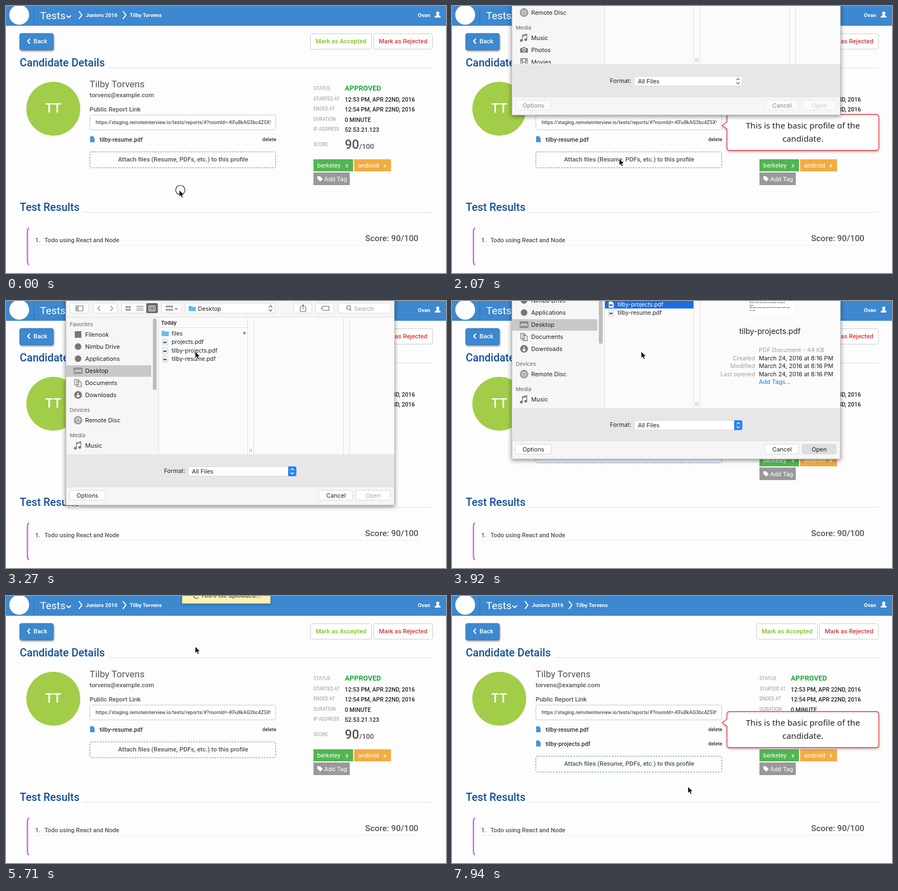
An HTML page that plays this animation: 800 by 486 pixels, repeating every 8000 ms.

```html
<!DOCTYPE html>
<html lang="en">
<head>
<meta charset="utf-8">
<title>Candidate report</title>
<style>
  html, body { margin: 0; width: 100%; height: 100%; overflow: hidden; background: #fdfdfd; }
  svg { display: block; width: 100%; height: 100%; }
  text { font-family: Roboto, sans-serif; font-weight: 500; font-size: 11.4px; fill: #555; }
  .mid { text-anchor: middle; }
  .white, .white text { fill: #fff; }
  .heading { font-size: 19.6px; fill: #14509a; }
  .crumb { font-size: 9.7px; font-weight: 700; fill: #fff; }
  .label { font-size: 8.5px; font-weight: 400; fill: #999; }
  .value { font-size: 10.5px; fill: #222; }
  .file text { font-size: 10.7px; fill: #333; }
  .file .delete { font-size: 9.2px; }
  .tag { font-weight: 400; fill: #fff; }
  .rule { stroke: #ddd; }
  .button { fill: #fff; stroke: #ccc; }
  .line { fill: none; stroke: #fff; stroke-width: 2; stroke-linecap: round; stroke-linejoin: round; }
  #bar { fill: none; stroke: #c66cf5; stroke-width: 2.5; }
  #attach rect { fill: #fdfdfd; stroke: #4a92d2; stroke-dasharray: 3 2; }
  .muted #bar { stroke: #bfbfcf; }
  .muted #attach rect { stroke: #7f8794; }
  .muted #berkeley { fill: #7cc653; }
  .muted #android { fill: #b3c846; }
  .muted #addTag { fill: #8f9399; }
  #tip text { font: 400 15.2px "Noto Sans", sans-serif; fill: #222; text-anchor: middle; }
  #tip path { fill: #fff; stroke: #e5343a; stroke-width: 1.3; filter: drop-shadow(0 2px 2px #0004); }
  #sheet text { font-family: Inter, sans-serif; font-weight: 400; font-size: 10.8px; fill: #222; }
  #sheet .group { font-size: 9.6px; font-weight: 500; fill: #777; }
  #sheet .entry { font-size: 10.3px; }
  #sheet .gray { fill: #a0a0a0; }
  #sheet .end { text-anchor: end; }
  #sheet .control { fill: #fff; stroke: #d8d8d8; }
  #sheet .icon { fill: none; stroke: #666; stroke-width: 1.1; }
  #sheet .solid { fill: #777; stroke: none; }
  #sheet.idle .tool { opacity: .5; }
  #sheet.idle .list, #sheet.idle .blue { display: none; }
  #sheet.idle #viewMode { fill: #ddd; }
  #sheet .chosen { display: none; }
  #sheet.picked .chosen { display: inline; }
  #sheet.picked #pickName { fill: #fff; }
  #sheet.picked #open { fill: #dedede; }
  #sheet:not(.picked) #openText { fill: #aaa; }
</style>
</head>
<body>
<svg id="stage" viewBox="0 0 800 486" preserveAspectRatio="none">
  <defs>
    <clipPath id="linkClip"><rect x="160" y="200" width="321" height="24"/></clipPath>
    <clipPath id="sideClip"><rect x="109" y="29" width="168" height="249"/></clipPath>
    <g id="arrows" fill="none" stroke-width="1.3"><path d="M-3-2L0-5L3-2M-3 2L0 5L3 2"/></g>
  </defs>
  <rect width="800" height="486" fill="#fdfdfd"/>

  <!-- header -->
  <rect width="800" height="36" fill="#3d88cf"/>
  <path d="M50.5 0V36" stroke="#2f72b4"/>
  <circle cx="24" cy="16" r="18" fill="#fff"/>
  <text class="white" x="62" y="24" style="font-size:19px;font-weight:400">Tests</text>
  <path class="line" d="M110.500 18L114 21L117.500 18"/>
  <path class="line" d="M133 10L138 16.500L133 23M213 10L218 16.500L213 23"/>
  <text class="crumb" x="145" y="20">Juniors 2016</text>
  <text class="crumb" x="225" y="20">Tilby Torvens</text>
  <text class="crumb" x="749" y="20">Ovan</text>
  <path class="white" d="M785 10C788 10 788.500 13 787 16Q787 17.500 790 18.500V21H779.500V18.500Q783 17.500 783 16C781.500 13 782 10 785 10"/>

  <!-- actions -->
  <rect x="25" y="50" width="61" height="30" rx="3" fill="#3d88cf" stroke="#3577b6" style="filter:drop-shadow(1px 2px 1.500px #0006)"/>
  <path class="line" d="M43 60L39.500 64L43 68"/>
  <text class="white" x="50" y="68">Back</text>
  <rect class="button" x="553.500" y="50.500" width="111" height="28" rx="3"/>
  <rect class="button" x="668.500" y="50.500" width="107" height="28" rx="3"/>
  <text class="mid" x="609" y="68" style="fill:#7fc21f">Mark as Accepted</text>
  <text class="mid" x="722" y="68" style="fill:#d23a3c">Mark as Rejected</text>

  <!-- candidate -->
  <text class="heading" x="25" y="110">Candidate Details</text>
  <path class="rule" d="M187 112.500H776M138 375.500H776"/>
  <circle cx="86" cy="187" r="49" fill="#a2cd48"/>
  <text class="mid white" x="86" y="194" style="font-size:24px">TT</text>
  <text x="152" y="148" style="font-size:17px;font-weight:400">Tilby Torvens</text>
  <text x="152" y="166">torvens@example.com</text>
  <text x="152" y="192">Public Report Link</text>
  <rect class="button" x="152.500" y="198.500" width="338" height="27" rx="3"/>
  <text x="163" y="215" clip-path="url(#linkClip)" style="font-size:9px">https://staging.remoteinterview.io/tests/reports/#?roomId=-KFu8kAG3bc4Z5X9</text>
  <g class="file">
    <path d="M153 237H158L161 240V248H153Z" fill="#4b92d4"/>
    <text x="170" y="247">tilby-resume.pdf</text><text class="delete" x="466" y="246">delete</text>
  </g>
  <g class="file" id="newFile" transform="translate(0 26)">
    <path d="M153 237H158L161 240V248H153Z" fill="#4b92d4"/>
    <text x="170" y="247">tilby-projects.pdf</text><text class="delete" x="466" y="246">delete</text>
  </g>
  <g id="attach">
    <rect x="152.500" y="265.500" width="338" height="29" rx="3"/>
    <text class="mid" x="322" y="283">Attach files (Resume, PDFs, etc.) to this profile</text>
  </g>
  <g id="facts"></g>
  <text x="616" y="154" style="font-size:12.800px;font-weight:700;fill:#23a640">APPROVED</text>
  <text x="616" y="260" style="font-size:23px">90<tspan font-size="12.800">/100</tspan></text>
  <rect id="berkeley" x="559" y="279" width="72" height="22" fill="#52b554"/>
  <rect id="android" x="633" y="279" width="67" height="22" fill="#f3ac41"/>
  <rect id="addTag" x="559" y="303" width="66" height="23" fill="#999"/>
  <text class="tag" x="566" y="294">berkeley</text><text class="tag" x="617" y="294">x</text>
  <text class="tag" x="640" y="294">android</text><text class="tag" x="686" y="294">x</text>
  <path class="white" d="M566 310H571L576 315L571.500 319.500L566 314.500Z"/>
  <text class="tag" x="578.500" y="318.500">Add Tag</text>

  <!-- results -->
  <text class="heading" x="25" y="373">Test Results</text>
  <path id="bar" d="M42 404Q39 405 39 410V465Q39 470 42 471"/>
  <text x="53" y="430" style="font-size:11.100px">1.</text>
  <text x="70" y="430" style="font-size:11.100px">Todo using React and Node</text>
  <text x="653" y="427.500" style="font-size:15.300px">Score: 90/100</text>
  <path d="M53 435.500H749" stroke="#eee"/>

  <g id="toast">
    <rect x="320.500" y="-1" width="160" height="30" fill="#fcf1b6" stroke="#e3d9a2" style="filter:drop-shadow(0 1px 2px #0005)"/>
    <path id="spinner" d="M0-5A5 5 0 1 1-5 0" fill="none" stroke="#777" stroke-width="1.500"/>
    <text x="354" y="19" style="font-size:11.800px">100% file uploaded...</text>
  </g>

  <g id="tip">
    <path d="M505 197.500H771Q776 197.500 776 202.500V258Q776 263 771 263H505Q500 263 500 258V224L491.500 217.500L500 211V202.500Q500 197.500 505 197.500"/>
    <text x="638" y="223">This is the basic profile of the</text>
    <text x="638" y="247">candidate.</text>
  </g>

  <!-- file chooser -->
  <g id="sheet">
    <rect x="109" y="-20" width="597" height="391.500" fill="#f6f6f6" stroke="#bbb" style="filter:drop-shadow(0 2px 4px #0007)"/>
    <rect x="278" y="29" width="428" height="250" fill="#fbfbfb"/>
    <path d="M109 29.500H706M277.500 29V279M439.500 29V279M450.500 29V279M613.500 29V279M624.500 29V279" stroke="#dedede"/>
    <path d="M443.500 269V275M446.500 269V275" stroke="#aaa"/>
    <rect x="109.500" y="279" width="596" height="59" fill="#e7e7e7"/>
    <g class="tool" id="toolbar">
      <rect id="viewMode" x="255" y="4" width="21" height="18" rx="2" fill="#6a6a6a"/>
      <g class="icon">
        <path d="M127 9H140V18H127ZM131 9V18M129 11V16M171 9L167 13.500L171 18M190 9L194 13.500L190 18"/>
        <path d="M218 10H221V12H218ZM223 10H226V12H223ZM218 15H221V17H218ZM223 15H226V17H223ZM237 9.500H250M237 13H250M237 16.500H250"/>
        <path d="M291 9H294V11H291ZM296 9H299V11H296ZM301 9H303V11H301ZM291 15H294V17H291ZM296 15H299V17H296ZM301 15H303V17H301ZM307 13L309.500 15.500L312 13"/>
        <path d="M537 11H535V19H545V11H543M540 15V7L537.500 9.500M540 7L542.500 9.500M573 13L577 9.500H587V17H577Z"/>
        <circle cx="623" cy="12" r="3.500"/><path d="M625.500 15L628 18"/>
        <path d="M260 9H271V18H260ZM263.500 9V18M267.500 9V18" stroke="#fff"/>
        <use href="#arrows" x="481" y="13.500"/>
      </g>
      <path d="M332 9H337L338 10.500H345V18.500H332Z" fill="#59bdf0"/>
      <text x="349" y="17.500">Desktop</text><text class="gray" x="633" y="17.500">Search</text>
    </g>
    <g clip-path="url(#sideClip)"><g id="sidebar"></g></g>
    <rect id="thumb" x="267" y="32" width="7" height="130" rx="3.500" fill="#bdbdbd"/>

    <g class="list">
      <rect class="chosen" x="278" y="83" width="161" height="14.500" fill="#1b6ce0"/>
      <text class="entry" x="282" y="43" style="font-size:9.600px;font-weight:600">Today</text>
      <path d="M278 48.500H439" stroke="#ddd"/>
      <path d="M283 54H288L289 55.500H296V64H283Z" fill="#62c0ef"/>
      <path d="M432 55.500L437 58.500L432 61.500Z" fill="#777"/>
      <text class="entry" x="301" y="63">files</text>
      <text class="entry" x="301" y="78">projects.pdf</text>
      <text class="entry" id="pickName" x="301" y="93.500">tilby-projects.pdf</text>
      <text class="entry" x="301" y="109">tilby-resume.pdf</text>
      <g id="docs"></g>
    </g>
    <g class="chosen">
      <rect x="451" y="30" width="255" height="248" fill="#fbfbfb"/>
      <rect x="537" y="32" width="84" height="75" fill="#fff"/>
      <g id="page"></g>
      <text class="mid" x="578" y="144" style="font-size:13.800px">tilby-projects.pdf</text>
      <text class="gray" x="558" y="177">PDF Document - 44 KB</text>
      <g id="dates"></g>
      <text x="558" y="235" style="fill:#1a7be8">Add Tags...</text>
    </g>

    <text class="end" x="326" y="313">Format:</text>
    <rect class="control" x="331.500" y="301.500" width="196" height="17" rx="3"/>
    <text x="338" y="314">All Files</text>
    <use href="#arrows" x="520" y="310" stroke="#555"/>
    <g class="blue"><path d="M513 301H524Q528 301 528 305V315Q528 319 524 319H513Z" fill="#2a82f5"/><use href="#arrows" x="520.500" y="310" stroke="#fff"/></g>
    <path d="M109 338.500H706" stroke="#ddd"/>
    <g class="tool">
      <rect class="control" x="115.500" y="344.500" width="65" height="18" rx="3"/>
      <rect class="control" x="568.500" y="344.500" width="62" height="18" rx="3"/>
      <rect class="control" id="open" x="636.500" y="344.500" width="62" height="18" rx="3"/>
      <text class="mid" x="148" y="358">Options</text>
      <text class="mid" x="600" y="358">Cancel</text>
      <text class="mid" id="openText" x="667.500" y="358">Open</text>
    </g>
  </g>

  <g id="cursor">
    <circle id="ring" cx="2" cy="0" r="8.500" fill="none" stroke="#222" stroke-width="1.200"/>
    <path id="pointer" d="M0 0V12L2.800 9.500L4.800 14L6.900 13L5 8.800H8.800Z" stroke="#fff" stroke-width=".8"/>
    <path id="hand" d="M0 1Q1.500-1 2.700 1V5.500Q4-.0 5 5.500Q6.500 4.500 7 6Q9 5 9 7.500V10Q9 12 8 14H1.500Q0 11-3 8.500Q-3 6.500 0 8Z" fill="#fff" stroke="#111"/>
  </g>
</svg>
<script>
const LOOP = 8000;
const $ = id => document.getElementById(id);
const text = (x, y, label, cls = '') => `<text x="${x}" y="${y}" class="${cls}">${label}</text>`;
const fill = (id, parts) => { $(id).innerHTML = parts.join('') + $(id).innerHTML; };

fill('facts', [
  ['STATUS', 153], ['STARTED AT', 172, '12:53 PM, APR 22ND, 2016'], ['ENDED AT', 190, '12:54 PM, APR 22ND, 2016'],
  ['DURATION', 209, '0 MINUTE'], ['IP ADDRESS', 227, '52.53.21.123'], ['SCORE', 255]
].map(([label, y, value = '']) => text(559, y, label, 'label') + text(616, y + 1.5, value, 'value')));

fill('toolbar', [[116, 34], [159, 43], [210, 66], [283, 36], [326, 163], [523, 33], [563, 33], [604, 95]]
  .map(([x, w]) => `<rect class="control" x="${x}" y="4" width="${w}" height="18" rx="3"/>`));

const icons = {
  square: '<rect class="solid" x="-6" y="-6" width="12" height="12"/>',
  circle: '<circle class="solid" r="6"/>',
  screen: '<path d="M-7-5H7V5H-7ZM-7-3H7M-5 3H5"/>',
  pages: '<path d="M-6-6H1V4H-6ZM-2-3H3L6 0V7H-2Z"/>',
  down: '<circle class="solid" r="7"/><path d="M0-4V4M-3 1L0 4L3 1" stroke="#fff" stroke-width="1.8"/>',
  disc: '<circle r="7"/><circle r="5"/><circle r="2"/>',
  note: '<path d="M-3 5V-5L5-7V3M-3-3L5-5"/><circle class="solid" cx="-5" cy="5" r="2.5"/><circle class="solid" cx="3" cy="3.5" r="2.5"/>',
  camera: '<path class="solid" d="M-7-3H-3L-2-5H2L3-3H7V5H-7Z"/><circle r="2.5" stroke="#fff"/>',
  film: '<path d="M-6-6H6V6H-6ZM-3-6V6M3-6V6M-3 0H3M-6-3H-3M-6 3H-3M3-3H6M3 3H6"/>'
};
const places = [
  ['Favorites', 46], ['Filenook', 65, 'square'], ['Nimbu Drive', 87, 'circle'], ['Applications', 109, 'circle'],
  ['Desktop', 131, 'screen'], ['Documents', 153, 'pages'], ['Downloads', 175, 'down'], ['Devices', 202],
  ['Remote Disc', 221, 'disc'], ['Media', 248], ['Music', 267, 'note'], ['Photos', 289, 'camera'], ['Movies', 311, 'film']
];
fill('sidebar', ['<rect x="109" y="117" width="155" height="21" fill="#c8c8c8"/>', ...places.map(([label, y, icon]) => icon
  ? `<g class="icon" transform="translate(131 ${y - 4})">${icons[icon]}</g>` + text(144, y, label)
  : text(116, y, label, 'group'))]);

fill('docs', [74, 90, 105].map(y =>
  `<path d="M285 ${y - 5}H291L294 ${y - 2}V${y + 6}H285Z" fill="#fff" stroke="#aaa" stroke-width=".7"/><path d="M286 ${y}H292V${y + 3}H286Z" fill="#59718c"/>`));
fill('dates', [['Created', 192], ['Modified', 206], ['Last opened', 221]].map(([label, y]) =>
  text(551, y, label, 'gray end') + text(558, y, 'March 24, 2016 at 8:16 PM')));
fill('page', Array.from({ length: 14 }, (_, i) =>
  `<text x="541" y="${43 + i * 4.5}" style="font-size:3.4px">${['We plan each step and test the idea with care', 'for you.', 'Notes from the work and what we found', 'then.'][i % 4]}</text>`));

const progress = (t, from, to) => Math.min(1, Math.max(0, (t - from) / (to - from)));
const smooth = p => p * p * (3 - 2 * p);
const show = (id, on) => { $(id).style.display = on ? '' : 'none'; };
const move = (id, x, y) => $(id).setAttribute('transform', `translate(${x} ${y})`);

// Each leg: start, end, then the shift of the pointer.
const legs = [[840, 1500, -11, -57], [2440, 3180, 40, -186], [6600, 7900, 85, 255]];

function draw(t) {
  const uploaded = t >= 6300;
  show('newFile', uploaded);
  move('attach', 0, uploaded ? 26 : 0);
  $('stage').classList.toggle('muted', t >= 1500 && t < 2060);

  $('tip').style.opacity = t < 4000
    ? progress(t, 1150, 1400) - progress(t, 2440, 2700)
    : progress(t, 6780, 7000);
  move('tip', 0, uploaded ? 13 : 0);

  show('toast', t >= 5660 && t < 6510);
  move('toast', 0, -32 + 32 * progress(t, 5660, 5760) - 32 * progress(t, 6390, 6510));
  $('spinner').setAttribute('transform', `translate(346 15) rotate(${t * .4})`);

  const opening = 1 - (1 - progress(t, 1980, 2260)) ** 2;
  const closing = progress(t, 3720, 4150) ** 2;
  show('sheet', t >= 1980 && t < 4150);
  move('sheet', 0, -380 * (1 - opening) - 384 * closing);
  $('sheet').classList.toggle('idle', t < 2420);
  $('sheet').classList.toggle('picked', t >= 3360);
  move('sidebar', 0, t < 2420 ? -32 : 0);
  move('thumb', 0, t < 2420 ? -5 : 0);

  let x = 315, y = 335;
  for (const [from, to, dx, dy] of legs) {
    const p = smooth(progress(t, from, to));
    x += dx * p;
    y += dy * p;
  }
  const overAttach = t < 2060 && y < 294;
  move('cursor', x, y);
  show('ring', t < 90);
  show('hand', overAttach);
  show('pointer', !overAttach);
}

const start = performance.now();
function tick() {
  draw((performance.now() - start) % LOOP);
  requestAnimationFrame(tick);
}
tick();
</script>
</body>
</html>
```
